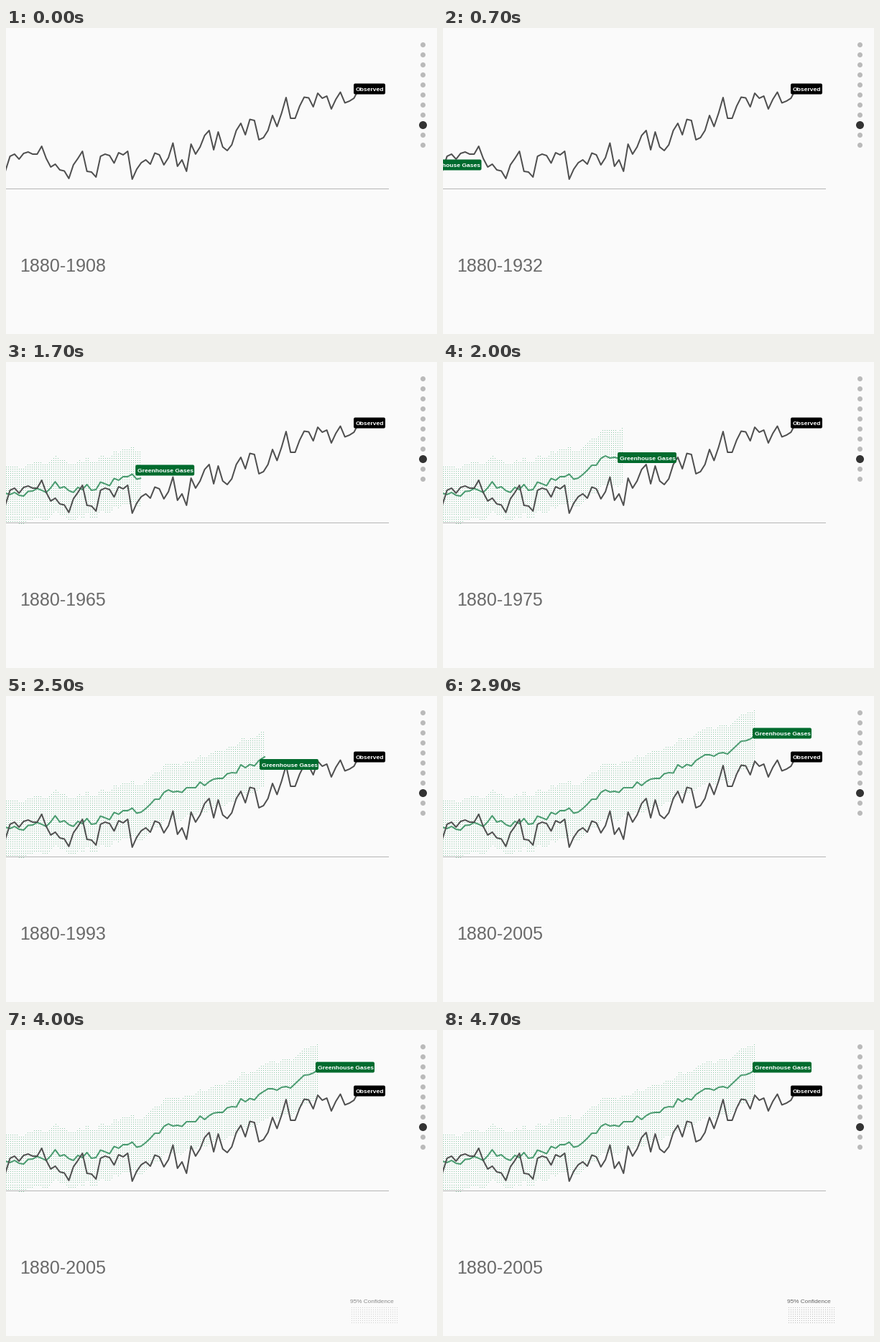
Recreate the animation shown at these times as a matplotlib script. Size 600 px wide and 427 px high, loop 5 s.

```python
import numpy as np
import matplotlib.pyplot as plt
from matplotlib.animation import FuncAnimation
from matplotlib.patches import Circle, FancyBboxPatch, Rectangle

W, H, DPI = 600, 427, 72  # at 72 dpi one point is one pixel
FRAMES, STEP = 50, 100
BG, DARK, GREEN, DEEP_GREEN = "#fafafa", "#4f4f4f", "#4a9b70", "#006b2e"
YEAR_PX, LAST_YEAR, LAST_X = 6.3, 2005, 434
FIRST_YEAR = 1936

plt.rcParams["font.family"] = "Liberation Sans"

# Heights on the stage, one per year from FIRST_YEAR
observed = [
    199, 179, 176, 183, 175, 173, 176, 176, 165, 182, 194, 190, 198, 199.5,
    210, 191, 182, 172, 200, 201, 208, 179, 176, 178, 188.5, 174, 177, 172,
    211, 197, 188, 184, 190, 174.5, 177, 191, 181, 160.5, 193, 184, 200, 162,
    176, 166, 150, 143, 170, 145, 166, 171, 163, 143, 133, 149, 127.5, 129,
    156, 153, 143, 122, 137.5, 119, 97, 126, 126, 109, 96.5, 97.5, 110, 91,
    98, 95, 113, 99.5, 89.5, 104.5, 102, 98, 86,
]
gases = [
    183, 185, 182, 186, 187, 180.5, 180, 176.5, 179, 182, 175.5, 167, 176, 174,
    179.5, 182, 175, 178, 171, 179, 178, 167.5, 170, 172.5, 162.5, 165, 160,
    160, 156.5, 163.5, 162, 157, 151, 144, 144, 134.5, 131, 134, 133, 134.5,
    128, 128, 128, 120, 125, 119.5, 116, 115, 115, 108.5, 107, 107.5, 96, 100,
    95.5, 97.5, 90, 86, 82, 82, 84, 80, 79, 81, 75, 69, 63, 62.5, 60, 56,
]

# Label path: frame, left edge, centre height
path = np.array([
    (0, -182, 212), (7, -28.5, 191), (12, 66, 173), (13, 97, 175),
    (18, 201, 145), (20, 243, 133.5), (24, 330, 102), (25, 353, 95.5),
    (29, 431, 52),
])


def year_x(year):
    return LAST_X + (np.asarray(year) - LAST_YEAR) * YEAR_PX


def ramp(i, start, end):
    return float(np.clip((i - start) / (end - start), 0, 1))


obs_x = year_x(FIRST_YEAR + np.arange(len(observed)))
gas_x = year_x(FIRST_YEAR + np.arange(len(gases)))

fig = plt.figure(figsize=((W + 1e-6) / DPI, (H + 1e-6) / DPI), dpi=DPI, facecolor=BG)
ax = fig.add_axes([0, 0, 1, 1])
ax.axis("off")


def dot_layer(rgb, z):
    """Full-stage image, transparent until its alpha is filled in."""
    rgba = np.zeros((H, W, 4))
    rgba[..., :3] = rgb
    image = ax.imshow(rgba, extent=(0, W, H, 0), interpolation="nearest",
                      aspect="auto", zorder=z)
    return rgba, image


class Label:
    """Rounded tag with bold white text."""

    def __init__(self, text, width, color, z):
        self.box = FancyBboxPatch((0, 0), width, 15, facecolor=color, edgecolor="none",
                                  boxstyle="round,pad=0,rounding_size=2.2", zorder=z)
        ax.add_patch(self.box)
        self.text = ax.text(0, 0, text, color="white", size=8.45, weight="bold",
                            zorder=z + 0.1, clip_on=True)

    def move(self, left, mid):
        self.box.set_x(left)
        self.box.set_y(mid - 7.5)
        self.text.set_position((left + 2.5, mid + 3))


rows, cols = np.mgrid[0:H, 0:W]
lattice = (rows % 3 == 0) & (cols % 3 == 0)
centre = np.interp(np.arange(W), gas_x, gases)
band = lattice & (rows > centre - 38) & (rows < centre + 40)
swatch = lattice & (cols >= 479) & (cols < 546) & (rows >= 386) & (rows < 411)

band_rgba, band_image = dot_layer((0.56, 0.79, 0.66), 1)
swatch_rgba, swatch_image = dot_layer((0.74, 0.74, 0.74), 1)

ax.set_xlim(0, W)
ax.set_ylim(H, 0)

ax.add_patch(Rectangle((0, 224), 533, 1, color="#b5b5b5", lw=0, zorder=2))
gas_line, = ax.plot([], [], color=GREEN, lw=2, zorder=3, solid_joinstyle="round")
ax.plot(obs_x, observed, color=DARK, lw=2, zorder=4, solid_joinstyle="round")

for n in range(11):
    active = n == 8
    ax.add_patch(Circle((580.5, 23.5 + 14 * n), 5.5 if active else 3.5, lw=0,
                        color="#333333" if active else "#bababa"))

gas_label = Label("Greenhouse Gases", 82, DEEP_GREEN, 6)
Label("Observed", 44, "black", 7).move(484, 85)

span = ax.text(19, 339.5, "", size=25, color="#6a6a6a")
legend = ax.text(479, 380.5, "95% Confidence", size=8.3, color="#666666")
marker, = ax.plot([69.5, 69.5], [111, 245], color="#b4b4b4", lw=1,
                  dashes=(4, 2), zorder=2)
marker_year = ax.text(0, 190.5, "", size=9, color="#858585", ha="center", zorder=5,
                      bbox=dict(facecolor=BG, edgecolor="none", pad=0.5, alpha=0.85))


def draw(i):
    left = np.interp(i, path[:, 0], path[:, 1])
    mid = np.interp(i, path[:, 0], path[:, 2])
    tip = min(left + 7, LAST_X)
    year = int(LAST_YEAR + (tip - LAST_X) / YEAR_PX)

    span.set_text(f"1880-{year}")
    gas_label.move(left, mid)

    shown = gas_x <= tip
    if shown.any():
        gas_line.set_data(np.append(gas_x[shown], tip),
                          np.append(np.array(gases)[shown], np.interp(tip, gas_x, gases)))
    else:
        gas_line.set_data([], [])
    band_rgba[..., 3] = band & (cols < tip)
    band_image.set_data(band_rgba)

    hover = int(np.interp(i, [30, 33, 36], [1947, 1952, 1953]))
    marker.set_visible(30 <= i < 36)
    marker_year.set_visible(30 <= i < 37)
    marker_year.set_text(str(hover))
    marker_year.set_x(year_x(hover) - 3.5)

    legend.set_alpha(ramp(i, 34, 42))
    swatch_rgba[..., 3] = swatch * ramp(i, 36, 42)
    swatch_image.set_data(swatch_rgba)
    return []


anim = FuncAnimation(fig, draw, frames=FRAMES, interval=STEP, repeat=True,
                     init_func=lambda: draw(0), blit=False)
plt.show()
```
